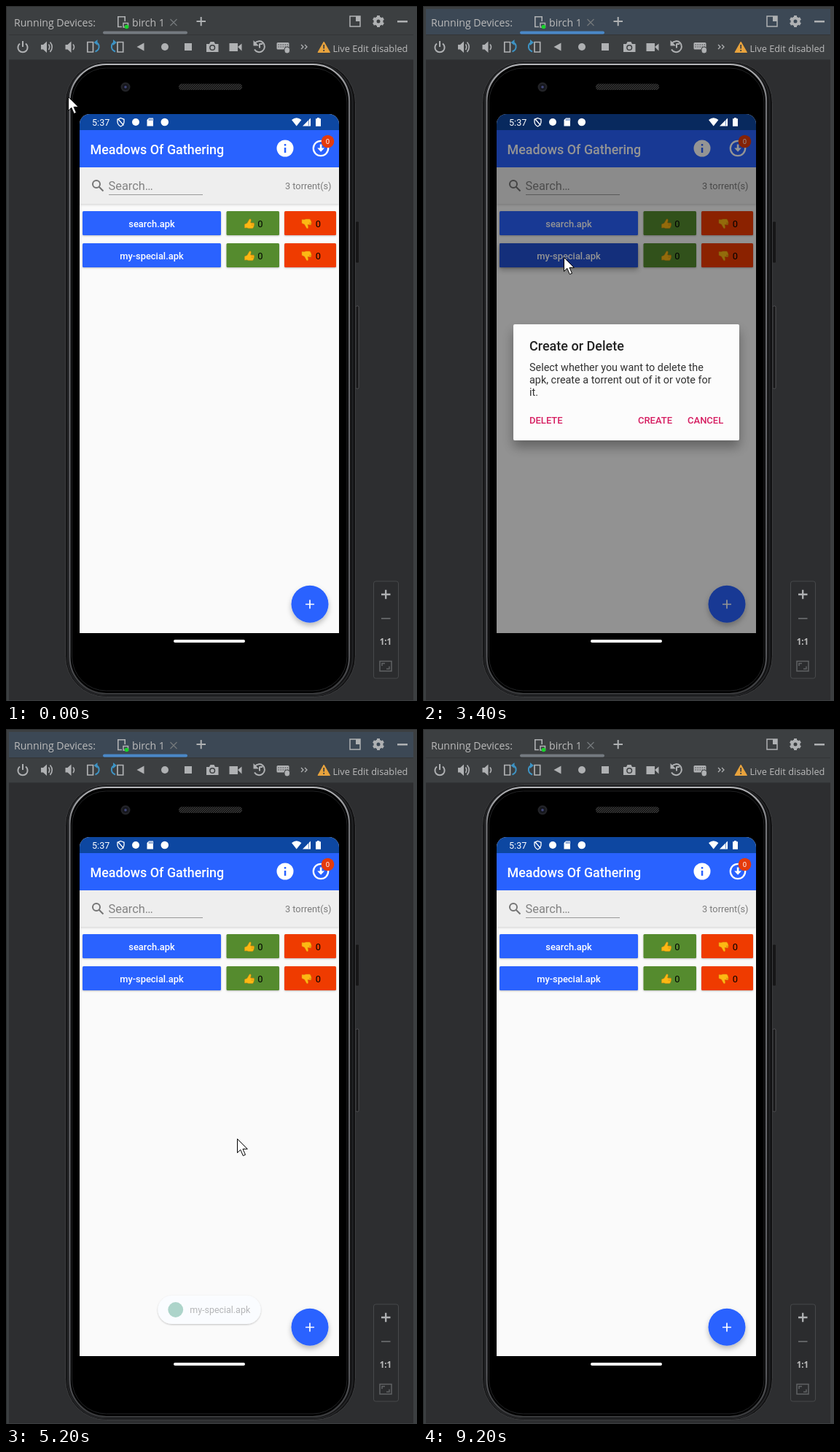
Write an HTML page that moves like this. It is 564x952 px and loops after 9.27 s.

```html
<!DOCTYPE html>
<html lang="en">
<head>
<meta charset="utf-8">
<title>Torrent app demo</title>
<style>
html, body { margin: 0; width: 100%; height: 100%; overflow: hidden; background: #2d2e30; }
svg { display: block; width: 100vw; height: 100vh; }
.ide { font: 14.1px "Open Sans", sans-serif; fill: #bbbbbb; }
.app { font: 12.9px Roboto, sans-serif; }
.med { font-weight: 500; }
.mid { text-anchor: middle; }
.ic { fill: #afb1b3; }
.ln { fill: none; stroke: #afb1b3; stroke-width: 2; }
</style>
</head>
<body>
<svg viewBox="0 0 564 952" xmlns="http://www.w3.org/2000/svg">
<defs>
  <filter id="lift" x="-20%" y="-30%" width="140%" height="180%"><feDropShadow dx="0" dy="1" stdDeviation=".9" flood-opacity=".24"/></filter>
  <filter id="softLift" x="-5%" y="-30%" width="110%" height="180%"><feDropShadow dx="0" dy="1.5" stdDeviation="1.6" flood-opacity=".14"/></filter>
  <filter id="fabLift" x="-40%" y="-40%" width="180%" height="200%"><feDropShadow dx="0" dy="4" stdDeviation="3.5" flood-opacity=".26"/></filter>
  <filter id="boxLift" x="-20%" y="-20%" width="140%" height="160%"><feDropShadow dx="0" dy="9" stdDeviation="8" flood-opacity=".34"/></filter>
  <linearGradient id="rim" x1="0" y1="0" x2="0" y2="1">
    <stop offset="0" stop-color="#b4b5b8"/><stop offset=".06" stop-color="#737478"/>
    <stop offset=".93" stop-color="#57585c"/><stop offset="1" stop-color="#38393b"/>
  </linearGradient>
  <pattern id="mesh" width="3" height="3" patternUnits="userSpaceOnUse">
    <rect width="3" height="3" fill="#141414"/><path d="M0 3L3 0" stroke="#484848" stroke-width=".9"/>
  </pattern>
  <clipPath id="screen"><path d="M101 859V162A14 14 0 0 1 115 148H443A14 14 0 0 1 457 162V859Z"/></clipPath>
  <clipPath id="row"><rect x="105" y="325" width="190" height="33" rx="1.500"/></clipPath>
  <path id="thumb" d="M1 8L4.5 6.5L7.5 1.2Q8.6 .2 9.6 1.4Q10 2.6 8.9 6H13Q14.5 6.4 13.9 8Q14.5 9 13.6 10Q13.9 11 13 11.8Q13 13.2 11.5 13.6H6.5L4 12.8L1 13Z"/>
</defs>

<!-- tool window -->
<rect width="564" height="952" fill="#2d2e30"/>
<rect width="564" height="74" fill="#3c3f41"/>
<path d="M0 0H4V952H0ZM559 0H564V952H559Z" fill="#3c3f41"/>
<path d="M0 .5H564M.5 0V952" stroke="#2b2d2e"/>
<path d="M4 951.5H559" stroke="#3c3f41"/>
<rect id="bar" x="4" y="4" width="555" height="35" fill="#3c3f41"/>
<path d="M4 39.5H559M4 73.5H559" stroke="#333537"/>
<g class="ide">
  <text x="11" y="28">Running Devices:</text>
  <text x="173" y="28">birch 1</text>
  <text x="448.500" y="63" style="font-size:12.75px">Live Edit disabled</text>
</g>
<rect id="tab" x="133" y="34.500" width="116" height="4" rx="2" fill="#747a80"/>
<path class="ln" style="stroke-width:1.600" d="M159 28.500H153.800V14.800H163.200V21"/>
<path class="ln" style="stroke-width:1.500" d="M161 23.500H167.500V29H161Z"/>
<circle cx="165.500" cy="28.500" r="2.800" fill="#19d32b"/>
<path class="ln" style="stroke:#74787b;stroke-width:1.300" d="M225.500 18L234.500 27M234.500 18L225.500 27"/>
<path class="ln" d="M261.500 21H274M267.700 15V27.200"/>
<path class="ln" style="stroke-width:1.500" d="M472 14H486V28H472Z"/>
<path class="ic" d="M480 14H486V21H480ZM537 20H551V22.500H537Z"/>
<g id="gear" transform="translate(511 21)"><circle class="ln" r="4.500" style="stroke-width:4"/></g>

<g class="ic">
  <path class="ln" d="M19 51.500A6.600 6.600 0 1 0 27 51.500M23 48V56"/>
  <path d="M48 53H51L56 48.500V64L51 59.500H48ZM81.500 53H84.500L89.500 48.500V64L84.500 59.500H81.500Z"/>
  <path class="ln" style="stroke-width:1.600" d="M58.500 52.500Q61 56 58.500 60M60.500 49.500Q66 56 60.500 63M92 52.500Q95 56 92 60"/>
  <g id="turn">
    <path class="ln" style="stroke-width:1.700" d="M111.800 49.500H119.500V63H111.800Z"/>
    <path class="ln" style="stroke:#3d93c4" d="M122.500 62.500Q128.500 60 127.500 54Q126.500 50.500 123 50"/>
    <path d="M125.500 46V54L120.500 50Z" fill="#3d93c4"/>
  </g>
  <use href="#turn" transform="matrix(-1 0 0 1 272.500 0)"/>
  <path d="M179.500 56L189.500 50.500V61.500Z"/>
  <circle cx="218" cy="56" r="5"/>
  <rect x="245" y="51" width="10" height="10"/>
  <path d="M275 52H279L280.500 49H285.500L287 52H291.500V63H275Z"/>
  <circle cx="283.200" cy="57" r="3.300" fill="none" stroke="#3c3f41" stroke-width="1.500"/>
  <path d="M306.500 51H318V62H306.500ZM318 56L323.500 51.500V61.500Z"/>
  <path class="ln" d="M341.500 51A7.500 7.500 0 1 1 341 59.500M348 52H352M348 51.500V57.500"/>
  <path d="M339.500 47V54.500H347Z"/>
  <rect x="371.500" y="50" width="17" height="9.500" rx="1.500"/>
  <path d="M373.500 53H387M373.500 56H387" stroke="#3c3f41" stroke-width="1.200" stroke-dasharray="1.500 1.500"/>
  <rect x="382" y="56" width="7.500" height="9" rx="3.500" stroke="#3c3f41"/>
  <path class="ln" style="stroke-width:1.300" d="M405 53L408 56L405 59M410 53L413 56L410 59"/>
</g>
<path d="M436.200 49L444.500 63.500H428Z" fill="#e8a33d" stroke="#e8a33d" stroke-linejoin="round"/>
<path d="M436.200 53V58.500M436.200 60V62" stroke="#3c3f41" stroke-width="1.700"/>

<!-- handset -->
<rect x="479.500" y="295" width="5" height="57" rx="1.500" fill="#161617" stroke="#343537" stroke-width=".7"/>
<rect x="480" y="411" width="4" height="113" rx="1.500" fill="#171718" stroke="#5d5e61" stroke-width=".8"/>
<rect x="81.500" y="76.500" width="398" height="870" rx="56" fill="#111112" stroke="#3c3d3f"/>
<rect x="84.500" y="78.500" width="391" height="866" rx="53" fill="none" stroke="#232426" stroke-width="2"/>
<rect x="87.500" y="80" width="383.500" height="862" rx="50" fill="#000" stroke="url(#rim)" stroke-width="2.200"/>
<rect x="90.500" y="85" width="377.500" height="853" rx="47" fill="#000" stroke="#222325"/>
<circle cx="164" cy="111" r="6.500" fill="#222327"/><circle cx="164" cy="111" r="4" fill="#15161d"/><circle cx="164" cy="111" r="1.800" fill="#42477a"/>
<rect x="237" y="106.500" width="87" height="8.500" rx="4" fill="url(#mesh)"/>
<rect x="230" y="868" width="98" height="4" rx="2" fill="#fff"/>

<!-- app -->
<g clip-path="url(#screen)" class="app">
  <rect x="101" y="148" width="356" height="711" fill="#fafafa"/>
  <rect x="101" y="221" width="356" height="50" fill="#eeeeee" filter="url(#softLift)"/>
  <rect x="101" y="148" width="356" height="22" fill="#0d47a1"/>
  <rect x="101" y="170" width="356" height="51" fill="#2962ff"/>
  <text class="med" x="115.500" y="202.500" font-size="17.900" fill="#fff">Meadows Of Gathering</text>
  <circle cx="383" cy="195" r="11.500" fill="#fff"/>
  <path d="M381.800 189H384.300V191.500H381.800ZM381.800 194H384.300V201H381.800Z" fill="#2962ff"/>
  <circle cx="432" cy="195" r="10.200" fill="none" stroke="#fff" stroke-width="2.300"/>
  <path d="M430.800 189.500H433.400V194.500H437L432.100 199.700L427.200 194.500H430.800Z" fill="#fff"/>
  <circle cx="441.500" cy="185.500" r="8.800" fill="#e53a0b"/>
  <text class="mid" x="441.500" y="189" font-size="9.500" fill="#fff">0</text>
  <g fill="none" stroke="#757575" stroke-width="2"><circle cx="124" cy="244" r="5"/><path d="M127.700 247.700L133.500 253.500"/></g>
  <text x="140.500" y="252" font-size="16.400" fill="#838383">Search…</text>
  <path d="M141 258.500H270" stroke="#9a9a9a"/>
  <text x="383" y="251" font-size="12.750" fill="#7b7b7b">3 torrent(s)</text>
  <g id="rows"></g>
  <g filter="url(#fabLift)"><circle cx="417" cy="819.300" r="25.500" fill="#2962ff"/></g>
  <path d="M411 819.500H423M417 813.500V825.500" stroke="#fff" stroke-width="1.700"/>
  <rect id="dim" x="101" y="148" width="356" height="711"/>

  <!-- status bar -->
  <g fill="#fff">
    <text x="118" y="163.500" font-size="12.600">5:37</text>
    <path d="M157.500 153.500L162 155.300V159Q161.500 163 157.500 165Q153.500 163 153 159V155.300ZM154 155L161.500 163.500" fill="none" stroke="#fff" stroke-width="1.300"/>
    <circle cx="178" cy="159" r="5"/>
    <path d="M196 153.500H202V164.500H193.500V156Z"/>
    <path d="M196.500 154.500V157M198.500 154.500V157M200.500 154.500V157" stroke="#0d47a1" stroke-width=".9"/>
    <circle cx="217.800" cy="159" r="5.300"/>
    <path d="M392 156Q398.700 150.500 405.400 156L398.700 164.500Z"/>
    <path d="M418 153.500V164.500H407Z"/>
    <path d="M415.500 156.200V163.700" stroke="#0d47a1" stroke-width=".6"/>
    <path d="M427 153H430V154.200H432V164.800H425V154.200H427Z"/>
  </g>

  <g id="dialog">
    <rect x="124" y="435" width="310" height="159" rx="2" fill="#fff" filter="url(#boxLift)"/>
    <text class="med" x="146" y="471" font-size="18" fill="#212121">Create or Delete</text>
    <g font-size="14.400" fill="#303030">
      <text x="146" y="499">Select whether you want to delete the</text>
      <text x="146" y="516">apk, create a torrent out of it or vote for</text>
      <text x="146" y="533">it.</text>
    </g>
    <g class="med" font-size="13" fill="#d81b60">
      <text x="146" y="570.800">DELETE</text><text x="295" y="570.800">CREATE</text><text x="363" y="570.800">CANCEL</text>
    </g>
  </g>

  <g id="toast">
    <rect x="206.500" y="775.500" width="145" height="40" rx="20" fill="#fafcff" filter="url(#lift)"/>
    <g id="toastBody">
      <circle cx="231.500" cy="795.500" r="10.700" fill="#1d8a68"/>
      <text x="251.500" y="800" font-size="12.800" fill="#323232">my-special.apk</text>
    </g>
  </g>
</g>

<!-- zoom controls -->
<rect x="504.500" y="788" width="34" height="133" rx="3" fill="#2b2c2e" stroke="#47494b"/>
<path class="ln" style="stroke-width:2.300" d="M515 806H527.500M521.200 799.800V812.200"/>
<path class="ln" style="stroke:#606264" d="M515 839H527.500"/>
<text class="ide mid" x="521" y="875" style="font-size:11.500px;font-weight:700">1:1</text>
<path class="ln" style="stroke:#606264;stroke-width:1.500" d="M513 897.500H529V911H513ZM516 904V900.500H520M526 904.500V908H522"/>

<path id="cursor" d="M.5 .5V19.500L4.800 15.300L8.300 23.500L11.500 22.200L8 14.300H14.300Z" fill="#fff" stroke="#000" stroke-linejoin="round"/>
</svg>
<script>
const $ = id => document.getElementById(id);
const set = (id, name, value) => $(id).setAttribute(name, value);
const clamp = x => Math.max(0, Math.min(1, x));
const smooth = x => x * x * (3 - 2 * x);
const LOOP = 9270, STEP = 66.7;

// Each move: start, end, steps, from, control, to
const moves = [
  [400, 670, 5, [85, 124], [86, 210], [91, 289]],
  [1600, 1870, 5, [91, 289], [120, 232], [193, 344]],
  [3930, 4600, 10, [193, 344], [335, 430], [317, 561]],
  [5670, 6130, 8, [317, 561], [290, 690], [237, 797]],
  [6930, 7270, 6, [237, 797], [180, 840], [106, 956]]
];

function vote(x, y, color, thumb, w) {
  return `<rect x="${x}" y="${y}" width="${w}" height="33" rx="1.5" fill="${color}" filter="url(#lift)"/>
    <use href="#thumb" fill="#fdb813" stroke="#d98a10" stroke-width=".5" transform="${thumb}"/>
    <path d="M${x + 34} ${y + 16.5}h3.5m-3.5 2.5h3" stroke="#c77c0c" stroke-width=".7"/>
    <text x="${x + 42.7}" y="${y + 22}">0</text>`;
}

function row(y, name, extra) {
  return `<rect x="105" y="${y}" width="190" height="33" rx="1.5" fill="#2962ff" filter="url(#lift)"/>${extra}
    <text class="med mid" x="200" y="${y + 21.5}" fill="#fff">${name}</text>` +
    vote(302.5, y, "#558b2f", `translate(326.5 ${y + 10})`, 72.5) +
    vote(382, y, "#ef3b00", `translate(405 ${y + 24.5}) scale(1 -1)`, 71);
}

$("rows").innerHTML = row(281, "search.apk", "") + row(325, "my-special.apk",
  `<g id="press"><rect x="105" y="325" width="190" height="33" rx="1.5" fill="#2962ff" filter="url(#fabLift)"/>
   <g clip-path="url(#row)"><rect x="105" y="325" width="190" height="33" opacity=".07"/>
   <circle id="ripple" cx="194" cy="345" opacity=".12"/></g></g>`);

for (let a = 0; a < 360; a += 60)
  $("gear").innerHTML += `<rect class="ic" x="-2" y="-8" width="4" height="4" transform="rotate(${a})"/>`;

function cursorAt(t) {
  let pos = moves[0][3];
  for (const [a, b, n, p, c, q] of moves) {
    if (t < a) break;
    const k = Math.floor((t - a + 5) / (b - a) * (n - 1));
    const u = smooth(clamp((k + 1) / n)), v = 1 - u;
    pos = p.map((_, i) => v * v * p[i] + 2 * u * v * c[i] + u * u * q[i]);
  }
  return pos;
}

// Screen updates arrive on a coarse tick
function snap(t) {
  const base = t < 4800 ? 2870 : t < 6900 ? 5000 : 6930;
  return base + Math.floor((t - base + 5) / STEP) * STEP;
}

function draw(t) {
  const focus = t >= 2730 && t < 9200;
  set("bar", "fill", focus ? "#3c4855" : "#3c3f41");
  set("tab", "fill", focus ? "#4a88c7" : "#747a80");
  set("cursor", "transform", `translate(${cursorAt(t).map(Math.round)})`);

  const s = snap(t);
  set("press", "opacity", s < 2865 ? 0 : clamp((s - 2800) / 200) * (1 - clamp((s - 3380) / 260)));
  set("ripple", "r", 20 + 100 * clamp((s - 2870) / 330));

  const gone = s < 5100 ? 1 : s < 5170 ? .35 : 0;
  const d = 1 - clamp((s - 3255) / 330);
  set("dim", "opacity", .6 * (1 - d * d) * gone);
  set("dialog", "opacity", clamp((s - 3260) / 147) * gone);
  const drop = 16.5 * Math.pow(1 - clamp((s - 3270) / 200), 2.5);
  set("dialog", "transform", `translate(0 ${drop.toFixed(2)})`);

  const show = s < 5190 ? 0 : clamp((s - 5110) / 260);
  const hide = clamp((s - 7270) / 340);
  const scale = .96 + .04 * show - .06 * hide;
  set("toast", "opacity", show ? 1 - hide : 0);
  set("toastBody", "opacity", show);
  set("toast", "transform", `translate(279 795.5) scale(${scale}) translate(-279 -795.5)`);
}

const start = performance.now();
function loop() {
  draw((performance.now() - start) % LOOP);
  requestAnimationFrame(loop);
}
draw(0);
requestAnimationFrame(loop);
</script>
</body>
</html>
```
